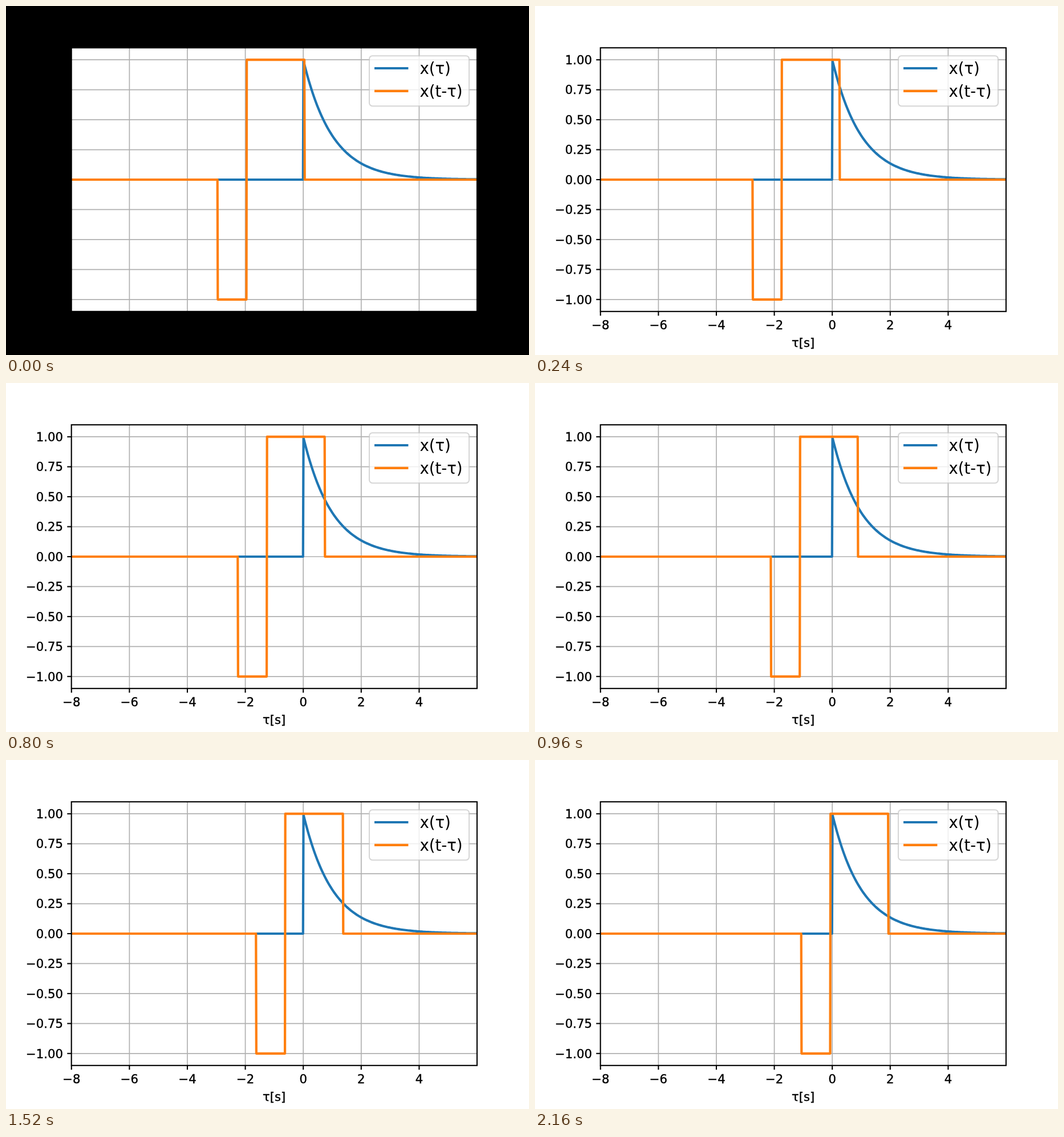
An HTML page for the animation above (2.24 s loop, 917x611 px).

```html
<!DOCTYPE html>
<html lang="en">
<head>
<meta charset="utf-8">
<title>Convolution of two signals</title>
<style>
  html, body { margin: 0; width: 100%; height: 100%; overflow: hidden; background: #fff; }
  svg { display: block; width: 917px; height: 611px; }
  text { font-family: "DejaVu Sans", sans-serif; }
  .label { font-size: 21.2px; stroke: #000; stroke-width: .4px; }
  .key { font-size: 27.6px; }
  .grid { stroke: #b0b0b0; stroke-width: 1.7; }
  .axis { stroke: #000; stroke-width: 2.1; fill: none; }
  .curve { fill: none; stroke-width: 4.2; stroke-linejoin: round; stroke-linecap: square; }
</style>
</head>
<body>
<svg id="plot" viewBox="0 0 917 611" xmlns="http://www.w3.org/2000/svg"></svg>
<script>
const BLUE = '#1f77b4', ORANGE = '#ff7f0e';
const STEP = 80, STEPS = 28;
const LEFT = 114.7, RIGHT = 825.9, TOP = 73.2, BOTTOM = 534.8;
const X = v => 521.2 + 50.8 * v;
const Y = v => 304 - 209.8 * v;
const plot = document.getElementById('plot');

function add(tag, attrs, parent = plot) {
  const el = document.createElementNS('http://www.w3.org/2000/svg', tag);
  for (const key in attrs) el.setAttribute(key, attrs[key]);
  return parent.appendChild(el);
}

function line(cls, x1, y1, x2, y2, extra) {
  return add('line', { class: cls, x1, y1, x2, y2, ...extra });
}

function text(cls, x, y, str, anchor = 'start') {
  add('text', { class: cls, x, y, 'text-anchor': anchor }).textContent = str;
}

const points = list => list.map(([x, y]) => `${X(x).toFixed(2)},${Y(y).toFixed(2)}`).join(' ');
const minus = str => str.replace('-', '\u2212');

const back = add('rect', { width: 917, height: 611 });
const box = { x: LEFT, y: TOP, width: RIGHT - LEFT, height: BOTTOM - TOP };
add('rect', { ...box, fill: '#fff' });
add('rect', box, add('clipPath', { id: 'area' }));

// Grid, ticks and labels
for (let v = -8; v <= 4; v += 2) {
  const x = X(v);
  if (v > -8) line('grid', x, TOP, x, BOTTOM);
  line('axis', x, BOTTOM, x, BOTTOM + 7.4);
  text('label', x, 565.7, minus(String(v)), 'middle');
}
for (let v = -1; v <= 1; v += .25) {
  const y = Y(v);
  line('grid', LEFT, y, RIGHT, y);
  line('axis', LEFT - 7.4, y, LEFT, y);
  text('label', 99.9, y + 7.8, minus(v.toFixed(2)), 'end');
}
text('label', 470.2, 597, 'τ[s]', 'middle');

// Signals
const area = add('g', { 'clip-path': 'url(#area)' });
const decay = [[-8, 0], [-.008, 0], [.008, .992]];
for (let v = .04; v <= 6.01; v += .04) decay.push([v, Math.exp(-v)]);
add('polyline', { class: 'curve', stroke: BLUE, points: points(decay) }, area);
const pulse = add('polyline', { class: 'curve', stroke: ORANGE }, area);

add('rect', { ...box, class: 'axis' });

// Legend
add('rect', {
  x: 637, y: 87.2, width: 175, height: 88, rx: 5.5,
  fill: '#fff', stroke: '#ccc', 'stroke-width': 2.1, opacity: .8
});
[['x(τ)', BLUE, 109], ['x(t-τ)', ORANGE, 148.9]].forEach(([name, stroke, y]) => {
  line('curve', 648.1, y, 703.3, y, { stroke });
  text('key', 725.4, y + 9.6, name);
});

// Pulse at shift t: -1 on [t-3, t-2], +1 on [t-2, t]
function pulseAt(t) {
  const d = .006;
  return [
    [-8, 0], [t - 3 - d, 0], [t - 3 + d, -1],
    [t - 2 - d, -1], [t - 2 + d, 1],
    [t - d, 1], [t + d, 0], [6, 0]
  ];
}

function draw(now) {
  const k = Math.floor(now / STEP) % STEPS;
  back.setAttribute('fill', k ? '#fff' : '#000');
  pulse.setAttribute('points', points(pulseAt(.044 + .07 * k)));
}

const start = performance.now();
function tick() {
  draw(performance.now() - start);
  requestAnimationFrame(tick);
}
tick();
</script>
</body>
</html>
```
